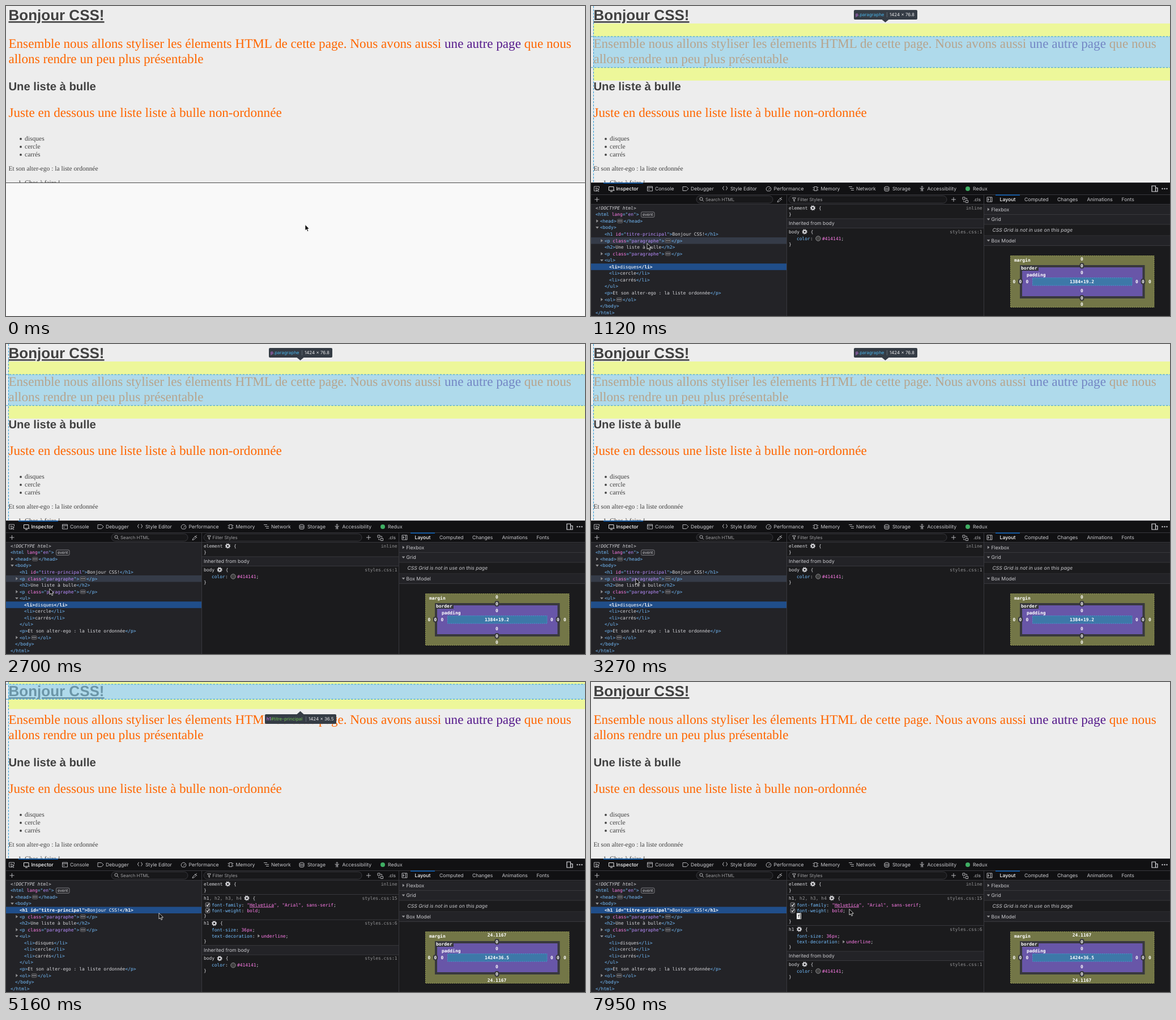
Recreate the animation shown at these times as an HTML page. Size 1022 by 548 pixels, loop 8 s.

```html
<!DOCTYPE html>
<html lang="fr">
<head>
<meta charset="utf-8">
<style>
html, body { margin: 0; width: 100%; height: 100%; overflow: hidden; background: #ededed; }
svg { display: block; width: 1022px; height: 548px; }
text { white-space: pre; text-rendering: geometricPrecision; }
.head { font-family: "Liberation Sans", Arial, sans-serif; font-weight: bold; fill: #414141; }
.title { font-size: 26px; text-decoration: underline 2px; text-underline-offset: 2px; }
.serif { font-family: "Liberation Serif", Times, serif; font-size: 11.56px; fill: #414141; }
.big { font-size: 23.16px; fill: #f60; }
.mono { font-family: "DejaVu Sans Mono", Menlo, monospace; font-size: 7.95px; fill: #d7d7db; }
.ui { font-family: Inter, sans-serif; font-size: 8.67px; fill: #cacace; }
.small { font-size: 7.95px; }
.mid { text-anchor: middle; }
.end { text-anchor: end; }
.icon { fill: none; stroke: #c4c4c8; stroke-width: .9; }
</style>
</head>
<body>
<svg id="stage" viewBox="0 0 1022 548"></svg>
<script>
const LOOP = 8000, CHAR = 4.786, ROW = 11.56;
const BLUE = '#75bfff', PINK = '#ff7de9', PURPLE = '#b98eff', GREY = '#939395', LINE = '#38383d';

// Each entry: start time, then the value held until the next entry
const cursorKeys = [
  [0, 528, 387], [150, 506, 391], [300, 410, 406], [450, 270, 424], [600, 150, 429], [850, 106, 424], [1120, 99, 420],
  [1420, 97, 414], [1570, 94, 408], [1720, 92, 404], [2020, 89, 402], [2200, 87, 403], [2400, 84, 408],
  [2550, 80, 422], [2700, 77, 433], [3000, 78, 425], [3270, 79, 415], [3410, 79, 413],
  [3620, 82, 404], [3770, 83, 400], [5000, 140, 403], [5150, 270, 409], [5300, 390, 411], [5510, 440, 407], [5720, 456, 402]
];
const hoverKeys = [[0, ''], [850, 'p'], [1720, 'h1'], [2550, 'p'], [2850, 'p2'], [3270, 'p'], [3770, 'h1'], [5300, '']];
const caretKeys = [[0, false], [6160, true], [6760, false], [7200, true], [7800, false], [7950, true]];
const held = (keys, t) => keys.filter(k => k[0] <= t).pop();

const esc = s => s.replace(/&/g, '&amp;').replace(/</g, '&lt;');
const span = (s, fill, extra = '') => `<tspan fill="${fill}" ${extra}>${esc(s)}</tspan>`;
const raw = (cls, x, y, body, extra = '') => `<text class="${cls}" x="${x}" y="${y}" ${extra}>${body}</text>`;
const text = (cls, x, y, s, extra) => raw(cls, x, y, esc(s), extra);
const rect = (x, y, w, h, fill, extra = '') => `<rect x="${x}" y="${y}" width="${w}" height="${h}" fill="${fill}" ${extra}/>`;
const path = (d, extra = 'class="icon"') => `<path d="${d}" ${extra}/>`;
const circle = (x, y, r, extra = 'class="icon"') => `<circle cx="${x}" cy="${y}" r="${r}" ${extra}/>`;
const hline = (x, y, w) => rect(x, y, w, 1, LINE);
const arrow = (x, y, open) => path(open ? `M${x - 2.8} ${y - 1.6}h5.6l-2.8 3.6z` : `M${x - 1.6} ${y - 2.8}v5.6l3.6-2.8z`, 'fill="#939395"');

function page() {
  const bullets = ['disques', 'cercle', 'carrés'].map((s, i) =>
    circle(26, 234.9 + 14 * i, 1.9, 'fill="#414141"') + text('serif', 33, 237.8 + 14 * i, s)).join('');
  return rect(0, 0, 1022, 312, '#ededed') +
    text('head title', 4.5, 25, 'Bonjour CSS!') +
    raw('serif big', 4.4, 73.6, 'Ensemble nous allons styliser les élements HTML de cette page. Nous avons aussi ' +
      span('une autre page', '#551a8b') + ' que nous') +
    text('serif big', 4.4, 101.3, 'allons rendre un peu plus présentable') +
    text('head', 4.4, 149, 'Une liste à bulle', 'font-size="20.3"') +
    text('serif big', 4.4, 196.2, 'Juste en dessous une liste liste à bulle non-ordonnée') +
    bullets + text('serif', 4.4, 291.1, 'Et son alter-ego : la liste ordonnée') +
    text('serif', 21.5, 315.7, '1.') + text('serif', 33, 315.7, 'Chos à faire !');
}

const boxes = {
  h1: { y: 4, h: 26.4, margin: 17.4, tip: 57, up: true, left: 457, width: 126, name: '#titre-principal', size: '1424 × 36.5' },
  p: { y: 54, h: 54.8, margin: 23.1, tip: 7, left: 464, width: 112, name: '.paragraphe', size: '1424 × 76.8' },
  p2: { y: 175, h: 27.7, margin: 23.1, tip: 128, left: 464, width: 112, name: '.paragraphe', size: '1424 × 38.4' }
};

function highlight(id) {
  const b = boxes[id];
  if (!b) return '';
  const guide = d => path(d, 'fill="none" stroke="#2c9bd6" stroke-dasharray="3.6 2.2"');
  const edge = b.up ? b.tip : b.tip + 17;
  return `<g opacity=".6">${rect(4, b.y - b.margin, 1018, b.margin, '#edff64')}${rect(4, b.y, 1018, b.h, '#87ceeb')}` +
    rect(4, b.y + b.h, 1018, b.margin, '#edff64') + '</g>' +
    guide(`M0 ${b.y}H1022`) + guide(`M0 ${b.y + b.h}H1022`) + guide('M4.5 0V312') +
    path(`M513.5 ${edge}h12l-6 ${b.up ? -5.5 : 5}z`, 'fill="#353c45"') +
    rect(b.left, b.tip, b.width, 17, '#353c45', 'rx="2"') +
    raw('ui small', b.left + 3, b.tip + 11.4, span(b.up ? 'h1' : 'p', '#df80ff') +
      span(b.name, b.up ? '#72c053' : '#49b1e6')) +
    rect(b.left + b.width - 53.8, b.tip + 4, .8, 9, '#6b737d') +
    text('ui small', b.left + b.width - 49, b.tip + 11.4, b.size, 'style="fill:#e8e8ea"');
}

function toolbar() {
  const tabs = [['Console', 113], ['Debugger', 176], ['Style Editor', 246], ['Performance', 322.5], ['Memory', 405.5],
    ['Network', 468], ['Storage', 532], ['Accessibility', 593.5], ['Redux', 674]];
  const side = [['Computed', 765], ['Changes', 823], ['Animations', 875.5], ['Fonts', 936.5]];
  const plus = x => path(`M${x - 4} 342h8M${x} 338v8`);
  const pill = (x, w) => rect(x, 335.5, w, 13, '#18181a', `rx="6.5" stroke="${LINE}"`);
  const activeLine = (x, y, w) => rect(x, y, w, 1.3, '#0a6fd6');
  return rect(0, 312, 1022, 236, '#1b1b1d') + rect(0, 351, 345, 197, '#232327') + rect(0, 312, 1022, 38, '#111113') +
    hline(0, 312, 1022) + hline(0, 333, 1022) + hline(0, 350, 1022) +
    activeLine(22, 312.4, 70) + activeLine(714, 333.6, 43) +
    text('ui', 44.5, 326.2, 'Inspector', 'font-weight="500" style="fill:#fff"') +
    tabs.map(([s, x]) => text('ui', x, 326.2, s)).join('') +
    text('ui', 721.5, 345.2, 'Layout', 'font-weight="500" style="fill:#fff"') +
    side.map(([s, x]) => text('ui', x, 345.2, s)).join('') +
    path('M9 327H5.5v-8h9v3M8.5 321.5l6 2.4-2.6 1 2 2.4-1 .9-2-2.4-1.2 2z') +
    path('M31.5 319.5h8.5v6.5h-8.5zM34 328h4M40 326l1.5 0', 'class="icon" style="stroke:#fff"') +
    path('M99.5 319h9v8h-9zM99.5 321h9M101.5 323l1.5 1-1.5 1') +
    path('M162 319.5h6.5l3.5 3.5-3.5 3.5H162z') +
    path('M235 319q-1.7 0-1.7 1.6t-1.3 1.4q1.3 0 1.3 1.5t1.7 1.8M238 319q1.7 0 1.7 1.6t1.3 1.4q-1.3 0-1.3 1.5t-1.7 1.8') +
    path('M311 327a4.3 4.3 0 1 1 5 0M313.5 324.5l2.5-3M311 327h5') +
    path('M394 319.5h5v7h-5zM391.5 321h2M391.5 325h2M399.5 321h2M399.5 325h2') +
    path('M455 319.5h6M457 322.5h7M459 325.5h5') +
    path('M518 320.5a4 1.4 0 0 1 8 0v5.5a4 1.4 0 0 1-8 0zM518 321a4 1.4 0 0 0 8 0M518 323.5a4 1.4 0 0 0 8 0') +
    circle(584.3, 319.8, 1.2) + path('M580.5 322l2.5.6v5M588 322l-2.5.6v5M583 322.6h2.5M583 325h2.5') +
    circle(665, 323, 4, 'fill="#3fae63"') +
    path('M990 318h6.5v10h-6.5zM996.5 321.5h3.5v6.5h-3.5z', 'class="icon" style="stroke:#e0e0e4;stroke-width:1.2"') +
    [1008.5, 1012.5, 1016.5].map(x => circle(x, 323, 1.2, 'fill="#c4c4c8"')).join('') +
    pill(186, 135) + pill(349, 279) + plus(10.5) + plus(640) +
    circle(194.5, 341, 2.6) + path('M196.5 343l2.4 2.6') +
    text('ui small', 202, 344.8, 'Search HTML', 'style="fill:#a0a0a3"') +
    path('M355.5 339h6l-2.3 3v3.5l-1.4-1V342z') + text('ui small', 364.5, 344.8, 'Filter Styles', 'style="fill:#a0a0a3"') +
    path('M329 346.5l1-2.5 4-4 1.8 1.8-4 4zM333.5 339l3.5 3.5M335.5 339.5l1.5-1.5') +
    path('M656 338h4v4h-4zM661 340h2.5v2M658 344v2h2M661.5 343.5h4v4h-4z') + text('ui small', 675, 344.8, '.cls') +
    path('M699 338h9v8h-9zM705.5 338v8M701 340.2l2 1.8-2 1.8z');
}

// x, opening code, closing code after a collapsed badge, row, arrow state
const nodes = [
  [8, '<html lang="en">', '', 1], [16, '<head>', '</head>', 2, false], [16, '<body>', '', 3, true],
  [24, '<h1 id="titre-principal">Bonjour CSS!</h1>', '', 4],
  [24, '<p class="paragraphe">', '</p>', 5, false], [24, '<h2>Une liste à bulle</h2>', '', 6],
  [24, '<p class="paragraphe">', '</p>', 7, false], [24, '<ul>', '', 8, true],
  [32, '<li>disques</li>', '', 9], [32, '<li>cercle</li>', '', 10], [32, '<li>carrés</li>', '', 11],
  [24, '</ul>', '', 12], [24, '<p>Et son alter-ego : la liste ordonnée</p>', '', 13],
  [24, '<ol>', '</ol>', 14, false], [16, '</body>', '', 15], [8, '</html>', '', 16]
];

function colour(code, selected) {
  const bold = selected ? 'font-weight="bold"' : '';
  const pick = c => selected ? '#fff' : c;
  return code.split(/(<[^>]*>)/).map(part => {
    if (part[0] !== '<') return span(part, pick('#d7d7db'));
    const [, open, name, equals, value, close] = part.match(/^(<\/?\w+ ?)(\w*)(=?"?)([^">]*)("?>)$/);
    return span(open, pick(BLUE), bold) + span(name, pick(PINK), bold) + span(equals, pick(BLUE), bold) +
      span(value, pick(PURPLE), bold) + span(close, pick(BLUE), bold);
  }).join('');
}

function tree(selectedRow, hoverRow) {
  const strip = (row, fill) => rect(0, 357 + row * ROW - 5.8, 345, ROW, fill);
  let out = strip(selectedRow, '#204e8a');
  if (hoverRow && hoverRow !== selectedRow) out += strip(hoverRow, '#353b48');
  out += text('mono', 8, 359.7, '<!DOCTYPE html>', 'font-style="italic"');
  for (const [x, code, close, row, open] of nodes) {
    const y = 357 + row * ROW, end = x + code.length * CHAR;
    out += raw('mono', x, y + 2.7, colour(code, row === selectedRow));
    if (open !== undefined) out += arrow(x - 5, y, open);
    if (close) {
      out += rect(end + 2, y - 3.2, 9, 6.6, LINE, 'rx="1.6" stroke="#737376" stroke-width=".7"') +
        [4, 6.5, 9].map(d => circle(end + d, y, .75, 'fill="#d7d7db"')).join('') +
        raw('mono', end + 12.8, y + 2.7, colour(close));
    }
  }
  return out + rect(88.5, 364, 23.5, 9.4, '#2a2a2e', 'rx="2" stroke="#8f8f93" stroke-width=".8"') +
    text('ui mid', 100.2, 371.1, 'event', 'style="font-size:7px"');
}

function selector(y, matched, rest, source) {
  const end = 349 + (matched + rest).length * CHAR;
  return raw('mono', 349, y + 2.7, span(matched, '#d7d7db') + span(rest, GREY)) +
    circle(end + 9, y, 2.6, 'fill="none" stroke="#d7d7db" stroke-width="2"') +
    circle(end + 9, y, 4, 'fill="none" stroke="#d7d7db" stroke-width="1.2" stroke-dasharray="1.57"') +
    text('mono', end + 19.5, y + 2.7, '{') + text('mono end', 690.5, y + 2.7, source, `style="fill:${GREY}"`);
}
const brace = y => text('mono', 349, y + 2.7, '}');
const prop = (y, name, value) => raw('mono', 363, y + 2.7, span(name, BLUE) + ': ' + value + ';');

function bodyRule(y) {
  return rect(346, y - 8, 347, 16, '#232327') + hline(346, y - 8.5, 347) + hline(346, y + 8, 347) +
    text('ui', 349, y + 3.2, 'Inherited from body') + selector(y + 15, 'body', '', 'styles.css:1') +
    raw('mono', 363, y + 29.7, span('color', BLUE) + ':') +
    circle(401, y + 27, 4.3, 'fill="#414141" stroke="#98989b" stroke-width=".8"') +
    raw('mono', 408, y + 29.7, span('#414141', PINK) + ';') + brace(y + 37);
}

function rules(isTitle, editing, caret, typed) {
  let out = selector(357, 'element', '', 'inline') + brace(368);
  if (!isTitle) return out + bodyRule(384);
  const shift = editing ? 0 : -10.3;
  const check = y => rect(352.2, y - 3.8, 7.6, 7.6, '#2a2a2e', 'rx="1.4" stroke="#a5a5a9" stroke-width=".8"') +
    path(`M354 ${y}l1.6 2 3-4.4`, 'fill="none" stroke="#fff" stroke-width="1.1"');
  const v = s => span(s, PINK);
  out += hline(346, 375, 347) + selector(382, 'h1', ', h2, h3, h4', 'styles.css:15') +
    prop(394, 'font-family', v('"') + span('Helvetica', PINK, 'text-decoration="underline"') + v('", "Arial", sans-serif')) +
    prop(404.2, 'font-weight', v('bold')) + check(394) + check(404.2);
  if (editing) {
    out += rect(363, 408.5, 8, 10.7, '#fff');
    if (typed) out += text('mono', 364, 416.8, 'f', 'style="fill:#18181a"');
    if (caret) out += rect(typed ? 369 : 364.2, 409.3, .9, 9.4, '#000');
  }
  return out + `<g transform="translate(0 ${shift})">` + brace(423.5) + hline(346, 430, 347) +
    selector(437, 'h1', '', 'styles.css:6') + prop(448.8, 'font-size', v('36px')) +
    raw('mono', 363, 461.9, span('text-decoration', BLUE) + ':') + arrow(446, 459.2, false) +
    raw('mono', 450.5, 461.9, v('underline') + ';') + brace(468.5) + bodyRule(484) + '</g>';
}

function layout(isTitle) {
  const section = (y, name, open) => rect(694, y - 8, 328, 16.5, '#232327') + hline(694, y + 8.5, 328) +
    arrow(701.5, y, open) + text('ui', 706.5, y + 3.2, name);
  const label = (x, y, s) => text('mono', x, y + 2.7, s, 'font-weight="bold" style="fill:#fff"');
  const value = (x, y, s) => text('mono mid', x, y + 2.7, s, 'font-weight="bold" style="fill:#fff"');
  const zero = (x, y, badge) => (badge ? rect(x - 4, y - 5, 8, 10, LINE, 'rx="3.5"') : '') + value(x, y, '0');
  const margin = isTitle ? '24.1167' : '0';
  return section(359.5, 'Flexbox', false) + section(377, 'Grid', true) +
    text('ui', 708.5, 399, 'CSS Grid is not in use on this page', 'font-style="italic"') +
    hline(694, 405.5, 328) + section(414.5, 'Box Model', true) +
    rect(740.5, 441.5, 253.5, 91, '#737647', 'stroke="#a7ad5c" stroke-dasharray="2 1.5" stroke-width=".9"') +
    rect(757, 458, 220.5, 59, LINE) + rect(761, 462, 212.5, 51, '#6856a8') +
    rect(779.5, 480.5, 175.5, 13.5, '#3d78a8', 'stroke="#3fa0d2" stroke-dasharray="2 1.5" stroke-width=".9"') +
    rect(757, 458, 33, 10, LINE) + label(747, 449.5, 'margin') + label(759, 463, 'border') + label(769, 475, 'padding') +
    value(866.5, 447, margin) + value(866.5, 527, margin) + value(866.5, 487, isTitle ? '1424×36.5' : '1384×19.2') +
    zero(866.5, 459, true) + zero(866.5, 471) + zero(866.5, 503) + zero(866.5, 516, true) +
    zero(747, 487) + zero(758, 487, true) + zero(770, 487) + zero(963.5, 487) + zero(974.5, 487, true) + zero(986.5, 487);
}

function scene(t) {
  const hover = held(hoverKeys, t)[1], isTitle = t >= 4870;
  const [, x, y] = held(cursorKeys, t);
  let out = page() + highlight(hover);
  if (t < 150) out += rect(0, 312, 1022, 236, '#f9f9f9') + rect(0, 312, 1022, 1, '#4a4a4a');
  else out += toolbar() + tree(t < 4660 ? 9 : 4, { h1: 4, p: 5, p2: 7 }[hover]) +
    rules(isTitle, t >= 5870, held(caretKeys, t)[1], t >= 7950) + layout(isTitle) +
    rect(345, 334, 1, 214, LINE) + rect(693, 334, 1, 214, LINE);
  return out + path('M0 0V10.4L2.4 8.2 4 12 5.8 11.2 4.2 7.6H7.4Z',
    `transform="translate(${x} ${y - .5})" fill="#000" stroke="#fff" stroke-width=".8"`);
}

const stage = document.getElementById('stage');
const changes = [...cursorKeys, ...hoverKeys, ...caretKeys, [4660], [4870], [5870]].map(k => k[0]);
let shown = -1;
function frame() {
  const t = performance.now() % LOOP;
  const step = Math.max(...changes.filter(c => c <= t));
  if (step !== shown) stage.innerHTML = scene(shown = step);
  requestAnimationFrame(frame);
}
frame();
</script>
</body>
</html>
```
